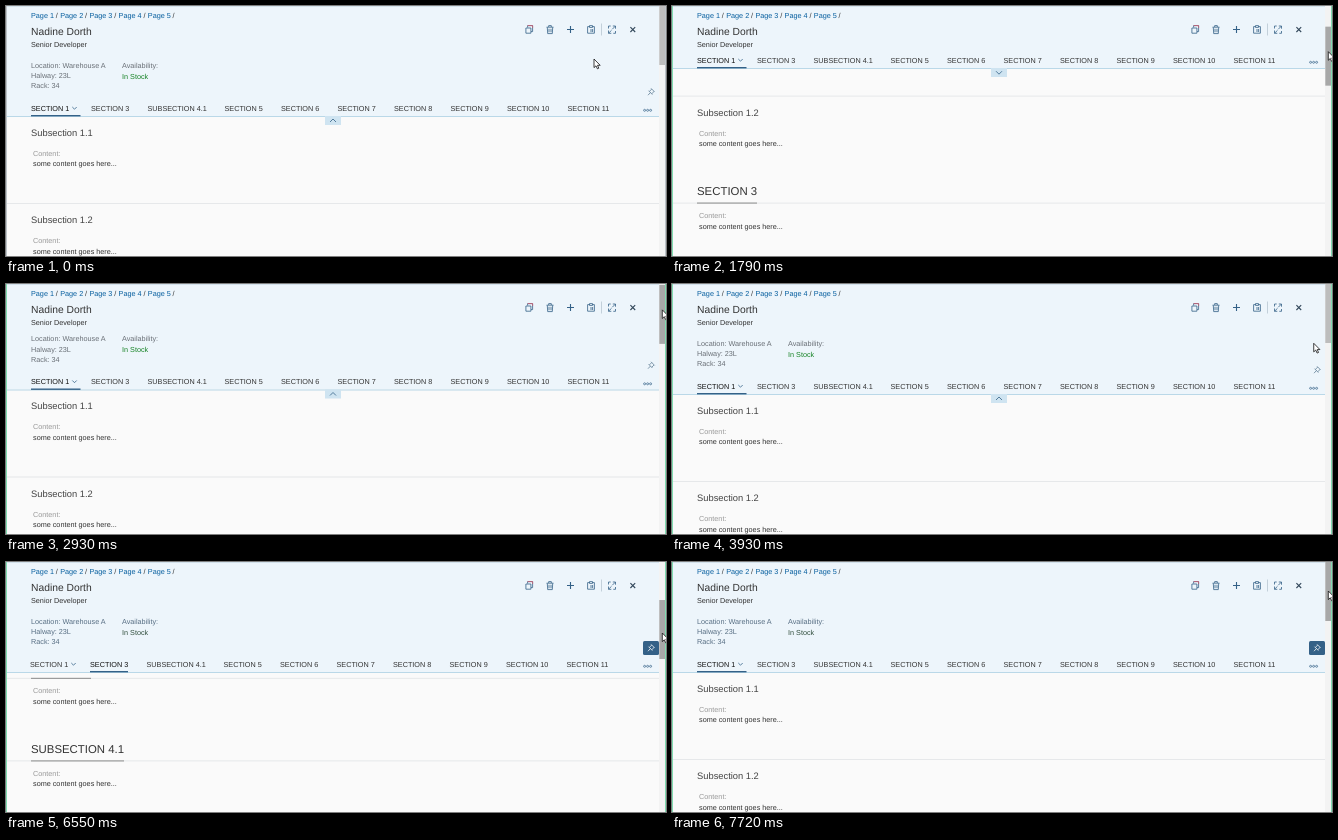
Write an HTML page that moves like this. It is 660 px wide and 250 px high and loops after 8000 ms.

```html
<!DOCTYPE html>
<html lang="en">
<head>
<meta charset="utf-8">
<title>Object page header</title>
<style>
html, body { margin: 0; width: 100%; height: 100%; overflow: hidden; background: #fafafa; }
svg { display: block; width: 660px; height: 250px; }
text { font: 7.25px "Liberation Sans", Arial, sans-serif; fill: #333; text-rendering: geometricPrecision; white-space: pre; }
.link { fill: #075f9f; }
.name { font-size: 10.3px; }
.sub { font-size: 9.35px; fill: #444; }
.section { font-size: 11.4px; }
.label { fill: #999; }
.info text { fill: #6a7077; }
.info .stock { fill: #188427; }
.pinned .info text { fill: #586f84; }
.pinned .info .stock { fill: #33503f; }
.active { fill: #111; }
.icon { fill: none; stroke: #346187; stroke-width: .8; }
.pin { stroke: #5a7890; stroke-width: .75; }
.pin-box { fill: #346187; opacity: 0; }
.pinned .pin-box { opacity: 1; }
.pinned .pin { stroke: #fff; }
</style>
</head>
<body>
<svg id="stage" viewBox="0 0 660 250" xmlns="http://www.w3.org/2000/svg">
  <rect width="660" height="250" fill="#fafafa"/>
  <g id="content"></g>

  <g id="header">
    <rect width="653" height="110" fill="#edf5fb"/>
    <rect y="110" width="653" height="1" fill="#bad8e8"/>
    <g class="info">
      <text x="25" y="62">Location: Warehouse A</text>
      <text x="25" y="72.2">Halway: 23L</text>
      <text x="25" y="82.4">Rack: 34</text>
      <text x="116" y="62">Availability:</text>
      <text class="stock" x="116" y="72.6">In Stock</text>
    </g>
    <rect class="pin-box" x="637" y="79" width="16" height="14" rx="1.5"/>
    <path class="icon pin" d="M642 89.2l2.4-2.6M642.6 84.7l3.8 3.8M643.5 85.3l2.2-2.2M645.8 87.7l2.2-2.2M645 82.3l3.6 3.6"/>
    <g id="tabs"><path class="icon" d="M66.3 101l2.2 2.2 2.2-2.2"/></g>
    <rect id="underline" y="109" height="1.4" fill="#346187"/>
    <g fill="none" stroke="#346187" stroke-width=".7">
      <circle cx="638.6" cy="104.3" r="1"/><circle cx="641.6" cy="104.3" r="1"/><circle cx="644.6" cy="104.3" r="1"/>
    </g>
    <g id="marker">
      <rect x="319" y="110" width="16" height="9" fill="#cfe4f1"/>
      <path id="arrow" class="icon"/>
    </g>
  </g>

  <g id="titlebar">
    <rect width="653" height="46" fill="#edf5fb"/>
    <rect width="653" height="1" fill="#d3e2ec"/>
    <text class="name" x="25" y="28.7">Nadine Dorth</text>
    <text x="25" y="41.2">Senior Developer</text>
    <g class="icon">
      <path d="M521.6 21.5v-1.9h5v6h-1.6M519.9 22h5v5.2h-5z"/>
      <path d="M521.6 19.6h5v2.2" stroke="#d05a6e"/>
      <path d="M540.5 21.2h7M542.7 21v-1.4h2.6V21M541.3 21.4l.4 6.2h4.6l.4-6.2M543 22.8v3.4M545 22.8v3.4"/>
      <path d="M564.5 20v7M561 23.5h7" stroke-width="1.1"/>
      <path d="M583.5 20.6h-1.9v6.6h6.8v-6.6h-1.9M583.5 19.6h3v1.8h-3zM585 23v3M586.6 23v3"/>
      <path d="M595.5 17.5v12" stroke="#c3d0da" stroke-width="1"/>
      <path d="M602.5 22.5v-2.5h2.2M606.8 20h2.7v2.7M609.3 20.2l-3 3M602.5 24.5v2.8h2.8M602.7 27.1l2.8-2.8M609.5 25v2.3h-2.2"/>
      <path d="M624.4 21.2l4.8 4.8M629.2 21.2l-4.8 4.8" stroke="#32475a" stroke-width="1.1"/>
    </g>
  </g>

  <rect x="653" width="6" height="250" fill="#f3f3f3"/>
  <rect id="thumb" x="653.3" width="5.7" height="59"/>
  <path id="edges" d="M0 0h1v250h-1zM659 0h1v250h-1z"/>
  <path id="cursor" d="M0 0v8.6l2-1.8 1.4 3 1.4-.6-1.3-2.9h2.7z" fill="#fff" stroke="#111" stroke-width=".8"/>
</svg>

<script>
const LOOP = 8000, SNAP = 48, PIN_AT = 4300;
const $ = id => document.getElementById(id);

function add(parent, tag, attrs, text) {
  const el = document.createElementNS("http://www.w3.org/2000/svg", tag);
  for (const key in attrs) el.setAttribute(key, attrs[key]);
  if (text) el.textContent = text;
  return parent.appendChild(el);
}
const label = (parent, x, y, text, cls = "") => add(parent, "text", { x, y, class: cls }, text);
const move = (el, x, y) => el.setAttribute("transform", `translate(${x} ${y})`);

// Static parts
for (let i = 0; i < 5; i++) {
  const x = 25 + 29.2 * i;
  label($("titlebar"), x, 12.2, "Page " + (i + 1), "link");
  label($("titlebar"), x + 24.8, 12.2, "/");
}

const tabs = [[25, "SECTION 1"], [85, "SECTION 3"], [141.5, "SUBSECTION 4.1"], [218.5, "SECTION 5"],
  [275, "SECTION 6"], [331.5, "SECTION 7"], [388, "SECTION 8"], [444.5, "SECTION 9"],
  [501, "SECTION 10"], [561.5, "SECTION 11"]
].map(([x, text]) => label($("tabs"), x, 104.6, text));

function block(y) {
  label($("content"), 27, y, "Content:", "label");
  label($("content"), 27, y + 10.4, "some content goes here...");
}
function rule(y) {
  add($("content"), "rect", { x: 0, y, width: 653, height: 1, fill: "#e6e8ea" });
}
[0, 87.4].forEach((dy, i) => {
  label($("content"), 25, 130 + dy, "Subsection 1." + (i + 1), "sub");
  block(149.9 + dy);
});
rule(197);
["SECTION 3", "SUBSECTION 4.1", "SECTION 5"].forEach((text, i) => {
  const y = 304 + 82.6 * i;
  label($("content"), 25, y - 7.8, text, "section");
  rule(y);
  add($("content"), "rect", { x: 25, y, width: text.length > 9 ? 93 : 60, height: 1, fill: "#8c8c8c" });
  block(y + 15.6);
});

// Motion
const part = (t, a, b) => Math.min(1, Math.max(0, (t - a) / (b - a)));
const smooth = p => p * p * (3 - 2 * p);
const out = (p, n) => 1 - Math.pow(1 - p, n);
const mix = (a, b, p) => a + (b - a) * p;

function scrollAt(t) {
  if (t < 2270) return 130 * out(part(t, 1310, 1960), 1.3);
  if (t < 5000) return 130 * (1 - out(part(t, 2270, 3030), 1.65));
  return 241 * (smooth(part(t, 6000, 6790)) - smooth(part(t, 6820, 7620)));
}

function cursorAt(t, thumbY) {
  const go = (x0, y0, x1, y1, a, b, ease = smooth) => {
    const p = ease(part(t, a, b));
    return [mix(x0, x1, p), mix(y0, y1, p)];
  };
  if (t < 1200) return go(588, 53, 656.3, 25, 60, 650);
  if (t < 3600) return [656.3, 25 + thumbY];
  if (t < 3930) return go(656.3, 25, 641.7, 59, 3600, 3930, p => p * p);
  if (t < 4800) return go(641.7, 59, 644, 86, 3930, 4130, p => out(p, 2));
  if (t < 5900) return go(644, 86, 656.3, 33, 4870, 5480);
  return [656.3, mix(33, 31, part(t, 6820, 7620)) - 2 * part(t, 7640, 7720) + thumbY];
}

function draw(t) {
  const scroll = scrollAt(t);
  const pinned = t >= PIN_AT;
  const shift = pinned ? 0 : Math.min(SNAP, scroll);
  const thumbY = scroll / (pinned ? 4.95 : 5.2);
  const [x, y] = cursorAt(t, thumbY);
  const current = pinned && scroll > 165 ? 1 : 0;

  $("stage").classList.toggle("pinned", pinned);
  move($("content"), 0, -scroll);
  move($("header"), 0, -shift);
  move($("tabs"), -current, 0);
  tabs.forEach((tab, i) => tab.setAttribute("class", i === current ? "active" : ""));
  $("underline").setAttribute("x", current ? 84 : 25);
  $("underline").setAttribute("width", current ? 38 : 49.5);
  $("marker").setAttribute("opacity", 1 - part(t, PIN_AT, 4700));
  $("arrow").setAttribute("d", shift < SNAP ? "M324 116l3-3 3 3" : "M324 113.2l3 3 3-3");
  $("thumb").setAttribute("y", thumbY);
  $("thumb").setAttribute("fill", x > 652 ? "#a8a8a8" : "#bdbdbd");
  $("edges").setAttribute("fill", t < 1000 ? "#bcc3c8" : "#7fdcb0");
  move($("cursor"), x, y);
}

function tick() {
  draw(performance.now() % LOOP);
  requestAnimationFrame(tick);
}
tick();
</script>
</body>
</html>
```
